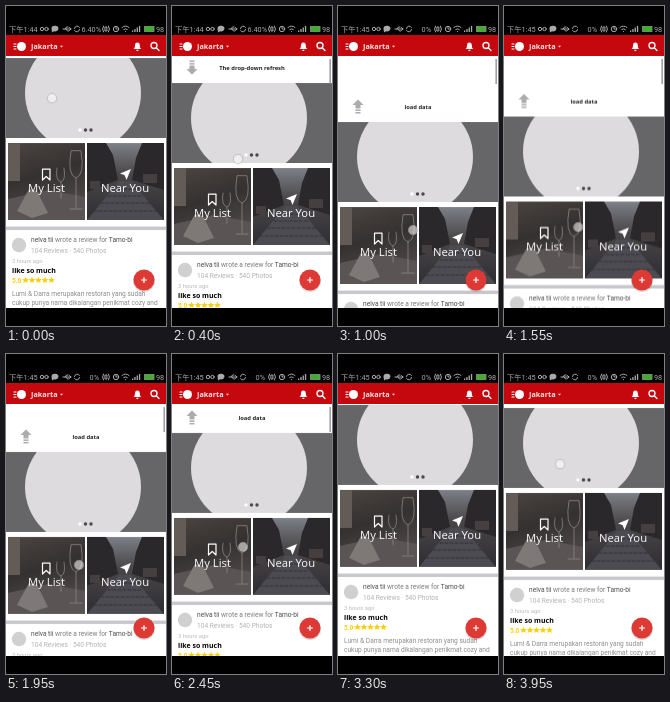
These frames come from a looping animation (160 px wide and 320 px high, 4000 ms). An HTML page:

```html
<!DOCTYPE html>
<html lang="en">
<head>
<meta charset="utf-8">
<title>Pull to refresh</title>
<style>
html, body { margin: 0; width: 100%; height: 100%; overflow: hidden; background: #000; }
svg { display: block; width: 160px; height: 320px; font-family: Roboto, "Noto Sans CJK SC", sans-serif; }

.list, .touch, .arrow, .bar, .pull, .load, .before, .after, .rate0, .rate1 {
  animation: 4s linear infinite;
}
.list { animation-name: list; }
.touch { animation-name: touch; }
.bar { animation-name: bar; }
.arrow { animation-name: flip; transform-box: fill-box; transform-origin: center; }
.pull { animation-name: pull; }
.load { animation-name: load; }
.before { animation-name: before; }
.after { animation-name: after; }
.rate0 { animation-name: rate0; }
.rate1 { animation-name: rate1; }
.pull, .load, .before, .after, .rate0, .rate1 { animation-timing-function: step-end; }

@keyframes list {
  0% { transform: translateY(1px); }
  10% { transform: translateY(26px); }
  25% { transform: translateY(65px); animation-timing-function: ease-out; }
  32% { transform: translateY(68px); }
  48.75% { transform: translateY(47px); }
  61.25% { transform: translateY(28px); }
  82.5%, 93.75% { transform: translateY(0); }
  98.75%, 100% { transform: translateY(3px); }
}
@keyframes touch {
  0% { transform: translate(46px, 92px); opacity: 1; }
  10% { transform: translate(66px, 153px); }
  25% { transform: translate(75px, 224px); animation-timing-function: ease-out; }
  32% { transform: translate(75px, 228px); }
  48.75% { transform: translate(73px, 211px); }
  61.25% { transform: translate(71px, 193px); }
  81% { transform: translate(68px, 166px); opacity: 1; }
  82.4%, 94.9% { transform: translate(68px, 166px); opacity: 0; }
  95% { transform: translate(46px, 92px); opacity: 1; }
  98.75% { transform: translate(56px, 110px); }
  100% { transform: translate(58px, 116px); opacity: 1; }
}
@keyframes bar {
  0%, 1% { opacity: 0; }
  4%, 70% { opacity: 1; }
  78%, 100% { opacity: 0; }
}
@keyframes flip {
  0%, 10.5% { transform: rotate(0); }
  15%, 62% { transform: rotate(180deg); }
  66.5%, 100% { transform: rotate(0); }
}
@keyframes pull { 0% { opacity: 1; } 10.5% { opacity: 0; } 62%, 100% { opacity: 1; } }
@keyframes load { 0% { opacity: 0; } 10.5% { opacity: 1; } 62%, 100% { opacity: 0; } }
@keyframes before { 0% { opacity: 1; } 12.5%, 100% { opacity: 0; } }
@keyframes after { 0% { opacity: 0; } 12.5%, 100% { opacity: 1; } }
@keyframes rate0 { 0% { opacity: 1; } 17.5%, 100% { opacity: 0; } }
@keyframes rate1 { 0% { opacity: 0; } 17.5%, 100% { opacity: 1; } }

.status { font-size: 7.3px; fill: #aaa; }
.bold { font-family: "Open Sans", sans-serif; font-weight: 700; }
.hint { font-size: 5.8px; text-anchor: middle; fill: #222; }
.label { font: 11.3px "Open Sans", sans-serif; text-anchor: middle; fill: #fff; }
.body { font-size: 6.6px; fill: #8c8c8c; }
.line { fill: none; stroke-linecap: round; stroke-linejoin: round; }
</style>
</head>
<body>
<svg viewBox="0 0 160 320">
  <defs>
    <clipPath id="page"><rect y="50" width="160" height="252"/></clipPath>
    <clipPath id="banner"><rect y="51" width="160" height="80"/></clipPath>
    <clipPath id="card"><rect width="77" height="77"/></clipPath>
    <linearGradient id="room" x1="0" y1="0" x2=".3" y2="1">
      <stop offset="0" stop-color="#4b4542"/>
      <stop offset=".5" stop-color="#353130"/>
      <stop offset="1" stop-color="#504b4a"/>
    </linearGradient>
    <linearGradient id="street" x1="0" y1="0" x2="0" y2="1">
      <stop offset="0" stop-color="#7d8088"/>
      <stop offset=".4" stop-color="#4a4748"/>
      <stop offset="1" stop-color="#2e2d33"/>
    </linearGradient>
    <path id="star" d="M0-3.4 1-1.1 3.400-.9 1.600.7 2.200 3 0 1.800-2.200 3-1.600.7-3.400-.9-1-1.100z"/>
  </defs>

  <rect width="160" height="320"/>

  <g class="status">
    <text class="before" x="3" y="26">下午1:44</text>
    <text class="after" x="3" y="26">下午1:45</text>
    <text class="rate0" x="95" y="25.7" text-anchor="end">6.40%</text>
    <text class="rate1" x="93" y="25.7" text-anchor="end">0%</text>
    <text x="150" y="25.7">98</text>
    <path d="M45.500 22.500a3.500 2.800 0 1 1 2.500 2.700L46 26.500z"/>
    <g class="line" stroke="#aaa">
      <circle cx="36" cy="23" r="1.700"/><circle cx="40.500" cy="23" r="1.700"/>
      <path d="M57 23h8M63.500 21.500l1.500 1.500-1.500 1.500M59 23l1.500-2h1.500M60 23l1.500 2h1"/>
      <path d="M68.500 22.500a2.700 2.700 0 0 1 5-1M73.500 23.500a2.700 2.700 0 0 1-5 1"/>
      <path d="M97.500 20q-2 3 0 6M102.500 20q2 3 0 6M99.300 21h1.600v4h-1.600z"/>
      <circle cx="110" cy="23" r="2.700"/><path d="M110 21.500V23h1.200"/>
      <path d="M116 21.500q3.500-3 7 0M117.700 23.500q1.800-1.500 3.600 0M119.500 25.500h.1"/>
    </g>
    <path d="M126 26v-1.500h1.300V26zM128.300 26v-3h1.300v3zM130.600 26v-4.500h1.300V26zM132.900 26v-6h1.300v6z"/>
    <rect x="138.500" y="20.500" width="9.500" height="5" fill="#3fae2d" stroke="#7f9f78" stroke-width=".8"/>
  </g>

  <rect y="29" width="160" height="21" fill="#c5070e"/>
  <path class="line" d="M8 38h2M8 40.500h2M8 43h2" stroke="#fff" stroke-width="1.200"/>
  <circle cx="15.500" cy="40.500" r="4.500" fill="#fff"/>
  <text class="bold" x="25" y="43" font-size="7.300" fill="#f4e4e4">Jakarta</text>
  <path d="M54 39.800h3l-1.500 1.800z" fill="#f4e4e4"/>
  <path d="M127.500 43q1.500-1 1.500-3.500a2.400 2.900 0 0 1 4.800 0q0 2.500 1.500 3.500zM130.200 43.700h2.400a1.200 1.200 0 0 1-2.400 0z" fill="#fff"/>
  <g class="line" stroke="#fff" stroke-width="1.300">
    <circle cx="148" cy="39.500" r="3"/><path d="M150.300 41.800l2.700 2.700"/>
  </g>

  <g clip-path="url(#page)">
    <rect y="50" width="160" height="252" fill="#fff"/>
    <g class="list">
      <path class="arrow" d="M17.500 28.500h5v1.500h-5zM17.500 31h5v1.500h-5zM17.500 33.500h5V37h3L20 42.500 14.500 37h3z" fill="#acacac"/>
      <text class="bold hint pull" x="80" y="37.800">The drop-down refresh</text>
      <text class="bold hint load" x="80" y="37.800">load data</text>

      <g clip-path="url(#banner)">
        <rect y="51" width="160" height="80" fill="#666567"/>
        <circle cx="77" cy="86" r="58" fill="#dddbdd"/>
      </g>
      <circle cx="74" cy="123" r="1.700" fill="#fff"/>
      <circle cx="79.500" cy="123" r="1.700" fill="#484848"/>
      <circle cx="85" cy="123" r="1.700" fill="#484848"/>

      <g transform="translate(2 136)" clip-path="url(#card)">
        <rect width="77" height="77" fill="url(#room)"/>
        <path d="M0 0h12v38H0z" fill="#625b56"/>
        <path d="M0 56 40 47 77 54V77H0z" fill="#5a5554"/>
        <path d="M9 68 21 46 29 48 40 70 24 75z" fill="#7e7977"/>
        <g class="line" stroke="#8b8582" stroke-width=".8">
          <path d="M63 8q-4 24 5 27 9-3 5-27zM68 35v30M62 66h12"/>
          <path d="M49 25q-2 12 4 14 5-2 3-14M53 39v16"/>
        </g>
      </g>
      <g transform="translate(81 136)" clip-path="url(#card)">
        <rect width="77" height="77" fill="url(#street)"/>
        <path d="M0 0h19l7 12 5 25L0 49zM77 0H55l-6 15-4 22 32 10z" fill="#2a282b"/>
        <path d="M32 38h12l33 39H0z" fill="#4d4b52"/>
        <path class="line" d="M27 46h24M21 53h35M14 60h48M7 68h62" stroke="#333238" stroke-dasharray="3 2"/>
        <path d="M3 38h10v8H3zM56 31h14v9H56z" fill="#45403f"/>
      </g>
      <path class="line" d="M36.500 162h7.500v11l-3.750-3.500L36.500 173z" stroke="#fff" stroke-width="1.200"/>
      <path d="M125 162l-4.500 11-1.800-4.700-4.700-1.800z" fill="#fff"/>
      <text class="label" x="40.500" y="185">My List</text>
      <text class="label" x="119" y="185">Near You</text>

      <rect y="219.500" width="160" height="3.500" fill="#c8c8cc"/>
      <circle cx="13" cy="238" r="7.200" fill="#d0d0d0"/>
      <text class="body" x="25" y="235" style="fill:#777"><tspan fill="#4a4a4a">nelva tii</tspan> wrote a review for <tspan fill="#4a4a4a">Tamo-bi</tspan></text>
      <text class="body" x="25" y="245.500" style="fill:#b2b2b2">104 Reviews · 540 Photos</text>
      <text x="6" y="256" font-size="5.800" fill="#b8b8b8">3 hours ago</text>
      <text class="bold" x="6" y="265.500" font-size="7">like so much</text>
      <g fill="#f8cf10">
        <text x="6" y="275.500" font-size="6.500" font-weight="700">5.0</text>
        <use href="#star" x="19.500" y="273"/><use href="#star" x="26" y="273"/>
        <use href="#star" x="32.500" y="273"/><use href="#star" x="39" y="273"/>
        <use href="#star" x="45.500" y="273"/>
      </g>
      <text class="body" x="6" y="288.500">Lumi &amp; Darra merupakan restoran yang sudah</text>
      <text class="body" x="6" y="297.500">cukup punya nama dikalangan penikmat cozy and</text>
      <text class="body" x="6" y="306.500">romantic spot. Saya dan pasangan sudah</text>
    </g>

    <rect class="bar" x="157.500" y="53" width="1.300" height="25" fill="#8a8a8a"/>
    <circle cx="138" cy="275" r="11" fill="#000" opacity=".15"/>
    <circle cx="138" cy="274" r="10.500" fill="#dd3a35"/>
    <path class="line" d="M135.500 274h5M138 271.500v5" stroke="#fff" stroke-width="1.200"/>
    <circle class="touch" r="4.700" fill="#fff" fill-opacity=".55" stroke="#999" stroke-opacity=".6" stroke-width=".8"/>
  </g>
</svg>
</body>
</html>
```
